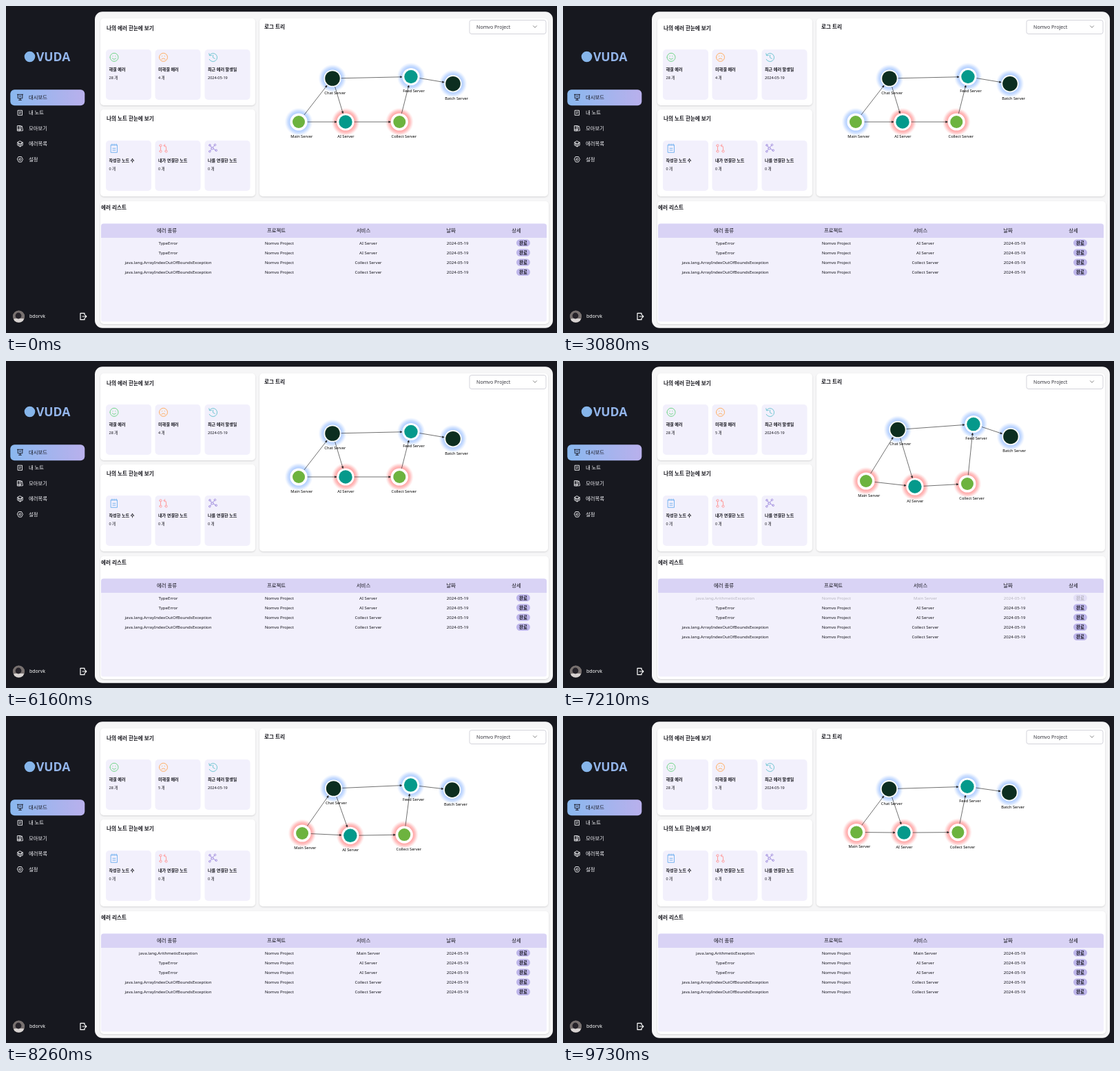
Animation, 800 px wide and 474 px high, one loop 9800 ms. Source, as an HTML page:

```html
<!DOCTYPE html>
<html lang="ko">
<head>
<meta charset="utf-8">
<style>
html, body { margin: 0; width: 100%; height: 100%; overflow: hidden; background: #17181f; }
svg { display: block; width: 800px; height: 474px; font-family: "Noto Sans", "Noto Sans CJK KR", "Noto Sans CJK", sans-serif; }
.icon { fill: none; stroke-linecap: round; stroke-linejoin: round; }
.card { fill: #fff; filter: drop-shadow(0 1px 1px #0002); }
</style>
</head>
<body>
<svg id="stage" viewBox="0 0 800 474">
  <defs>
    <linearGradient id="accent"><stop stop-color="#8ab8ef"/><stop offset="1" stop-color="#b9b0ec"/></linearGradient>
    <radialGradient id="blue"><stop offset=".58" stop-color="#a9c9ff"/><stop offset=".78" stop-color="#b8d2ff" stop-opacity=".7"/><stop offset="1" stop-color="#d0e1ff" stop-opacity="0"/></radialGradient>
    <radialGradient id="red"><stop offset=".58" stop-color="#ff9c9c"/><stop offset=".78" stop-color="#ffacac" stop-opacity=".7"/><stop offset="1" stop-color="#ffcccc" stop-opacity="0"/></radialGradient>
    <clipPath id="face"><circle cx="18.5" cy="450" r="8.7"/></clipPath>
  </defs>
</svg>
<script>
const stage = document.getElementById('stage');
const LOOP = 9800, UPDATE = 6930;

const rect = (x, y, w, h, fill, r = 0, extra = '') =>
  `<rect x="${x}" y="${y}" width="${w}" height="${h}" rx="${r}" fill="${fill}" ${extra}/>`;
const circle = (x, y, r, fill, extra = '') => `<circle cx="${x}" cy="${y}" r="${r}" fill="${fill}" ${extra}/>`;
// y is the middle of the line
const text = (x, y, size, str, { fill = '#15151c', weight = 400, anchor = 'start', extra = '' } = {}) =>
  `<text x="${x}" y="${y + size * .36}" font-size="${size}" font-weight="${weight}" fill="${fill}" text-anchor="${anchor}" ${extra}>${str}</text>`;
const icon = (x, y, color, d, width = 1) =>
  `<path class="icon" transform="translate(${x} ${y})" stroke="${color}" stroke-width="${width}" d="${d}"/>`;
const ring = (x, y, r) => `M${x - r} ${y}a${r} ${r} 0 1 0 ${2 * r} 0a${r} ${r} 0 1 0 ${-2 * r} 0`;
const bold = { weight: 700 };

function sidebar() {
  const menu = [
    ['대시보드', 'M-4-4H4M-3.3-4V1.5H3.3V-4M0 1.5V4M-2 4H2M-1.2-1.5H1.2'],
    ['내 노트', 'M-3-3.5H3V3.5H-3ZM-1.3-1H1.3M-1.3 1H.5'],
    ['모아보기', 'M-3.7-3.7H-1.2V3.7H-3.7ZM-1.2-3.7H1V3.7H-1.2M1.2-2.7L2.8-3.2L4 3.2L2.3 3.7M-3.7 1.8H1'],
    ['에러목록', 'M0-4L3.7-2V2L0 4L-3.7 2V-2ZM-3.7-2L0 0L3.7-2M0 0V4M-2-1V1.5M2-1V1.5'],
    ['설정', 'M-2-3.8H2L4 0L2 3.8H-2L-4 0Z' + ring(0, 0, 1.5)],
  ];
  return circle(34.5, 73.5, 7.8, '#86b5ea') +
    text(44, 73.5, 17.5, 'VUDA', { fill: '#93b5ea', weight: 800 }) +
    rect(6.3, 121.2, 108, 23, 'url(#accent)', 6) +
    menu.map(([name, d], i) => {
      const fill = i ? '#f4f4f8' : '#15151c', y = 132.3 + i * 22.5;
      return icon(20.5, y, fill, d, .9) + text(33, y - .2, 7.3, name, { fill, weight: 500 });
    }).join('') +
    `<g clip-path="url(#face)">${circle(18.5, 450, 9, '#77706f')}${rect(9, 453, 20, 8, '#d8d3d2', 5)}${circle(18, 449, 4.4, '#26232a')}</g>` +
    text(34, 449.5, 7, 'bdorvk', { fill: '#fff' }) +
    icon(112, 450, '#fff', 'M2-2.5V-4.7H-4V4.7H2V2.5M-1 0H4.7M3-1.8L4.8 0L3 1.8', 1.2);
}

function statCard(x, y, color, d, title, value, id = '') {
  return rect(x, y, 66, 73, '#f2f0fc', 5) + icon(x + 12, y + 11.3, color, d) +
    text(x + 4.5, y + 28.5, 6.1, title, bold) + text(x + 4.5, y + 40.8, 5.5, value, { extra: id });
}

function panels() {
  const face = ring(0, 0, 6) + 'M-2-1.7V-1.5M2-1.7V-1.5';
  const card = (x, y, w, h) => rect(x, y, w, h, '#fff', 5, 'class="card"');
  return rect(129, 8.2, 665, 458.6, '#f6f6f7', 11) +
    card(137, 18, 225, 126) + card(137, 150, 225, 126) + card(368, 18, 419, 258) + card(137, 283, 651, 178) +
    text(146, 32, 7.6, '나의 에러 한눈에 보기', bold) +
    statCard(145, 63, '#72d68a', face + 'M-2.8 1.5Q0 4.4 2.8 1.5', '해결 에러', '28 개') +
    statCard(216.5, 63, '#ffad61', face + 'M-2.8 3Q0 .2 2.8 3', '미해결 에러', '4 개', 'id="open"') +
    statCard(288.5, 63, '#70c6d2', 'M-5-3A6 6 0 1 1-5.3 3M-5.7-5.5L-5-2.5L-2-2.7M0-3V.5L2.7 2', '최근 에러 발생일', '2024-05-19') +
    text(146, 163.4, 7.6, '나의 노트 한눈에 보기', bold) +
    statCard(145, 195, '#79b4f0', 'M-4.5-5H4.5V6H-4.5ZM-3-6.3V-4M0-6.3V-4M3-6.3V-4M-2 0H2M-2 2.7H2', '작성한 노트 수', '0 개') +
    statCard(216.5, 195, '#ff9d9d', ring(-4, -4, 1.6) + ring(-4, 4.3, 1.6) + ring(4, 4.3, 1.6) + 'M-4-2.4V2.7M4 2.7V-2Q4-4 1-4M2.5-6L.5-4L2.5-2', '내가 연결한 노트', '0 개') +
    statCard(288.5, 195, '#a391df', ring(-1, 0, 1.7) + ring(-4.5, -4.5, 1.3) + ring(3, -5, 1.3) + ring(-4.7, 4.5, 1.3) + ring(4.7, 3, 1.3) + 'M-3.6-3.5L-2-1.4M2.2-4L0-1.5M-3.8 3.4L-2.2 1.4M.6.7L3.5 2.3', '나를 연결한 노트', '0 개') +
    text(375, 30.3, 7.6, '로그 트리', bold) +
    rect(673, 20.5, 111, 20, '#fff', 3, 'stroke="#cfcfd6" stroke-width=".9"') +
    text(683, 30.1, 7.1, 'Nomvo Project', { fill: '#33333b' }) +
    icon(768, 30, '#777', 'M-2.5-1.2L0 1.3L2.5-1.2', .9);
}

const columns = [235.5, 396.8, 526, 655.7, 751];

function row(y, error, service) {
  const cells = [error, 'Nomvo Project', service, '2024-05-19'];
  return cells.map((s, i) => text(columns[i], y, 6.1, s, { anchor: 'middle' })).join('') +
    rect(741, y - 5.2, 20, 10.4, '#bdb5ea', 5.2) +
    text(751, y, 6.4, '완료', { anchor: 'middle', weight: 600 });
}

function table() {
  const heads = ['에러 종류', '프로젝트', '서비스', '날짜', '상세'];
  const headX = [233.5, 392.5, 519, 646, 741];
  const arrays = 'java.lang.ArrayIndexOutOfBoundsException';
  const rows = [['TypeError', 'AI Server'], ['TypeError', 'AI Server'], [arrays, 'Collect Server'], [arrays, 'Collect Server']];
  return text(138, 292.3, 7.6, '에러 리스트', bold) +
    rect(138, 315.5, 647, 142, '#f2f0fc', 3) +
    `<path fill="#d9d3f5" d="M138 336V319.500q0-4 4-4H781q4 0 4 4V336Z"/>` +
    heads.map((s, i) => text(headX[i], 325.8, 7.4, s, { anchor: 'middle', weight: 500 })).join('') +
    `<g id="fresh">${row(343.4, 'java.lang.ArithmeticException', 'Main Server')}</g>` +
    `<g id="rows">${rows.map((r, i) => row(343.4 + i * 14.1, ...r)).join('')}</g>`;
}

const GREEN = '#6db33f', TEAL = '#05998b', DARK = '#0c2e20';
const discRadius = { [GREEN]: 9, [TEAL]: 9.7, [DARK]: 10.8 };
// path: positions at the times in `times`
const times = [UPDATE, 7210, 7770, 8820, 9800];
const nodes = [
  { name: 'Main', color: GREEN, rest: [425, 168], path: [[445, 176], [440, 174], [433, 171], [428, 169.3], [426, 168.5]] },
  { name: 'AI', color: TEAL, rest: [493, 168], path: [[516, 186], [511, 182], [504, 177], [497, 170.7], [495, 169]] },
  { name: 'Collect', color: GREEN, rest: [571.3, 168], path: [[591, 180], [587, 178], [582, 175], [575.7, 170], [573.3, 168.5]] },
  { name: 'Chat', color: DARK, rest: [474, 105], path: [[492, 96], [486, 99.5], [478, 104], [474, 105.7], [473.5, 105.7]] },
  { name: 'Feed', color: TEAL, rest: [588, 102.5], path: [[601, 87], [596, 91.5], [588.5, 98], [587, 101.5], [587, 102.3]] },
  { name: 'Batch', color: DARK, rest: [649, 112.7], path: [[652, 112], [650, 109.5], [647.5, 104.5], [648, 109], [648, 111]] },
];
const edges = [[0, 3], [0, 1], [3, 1], [3, 4], [1, 2], [2, 4], [4, 5]];

function graph() {
  return nodes.map((n, i) => `<g class="node">${circle(0, 0, 20.5, `url(#${i == 1 || i == 2 ? 'red' : 'blue'})`)}</g>`).join('') +
    edges.map(() => '<path class="edge" stroke="#333" stroke-width=".7" fill="#111"/>').join('') +
    nodes.map(n => `<g class="node">${circle(0, 0, 12.6, '#fff')}${circle(0, 0, discRadius[n.color], n.color)}` +
      text(-11.7, 20.9, 5.7, n.name + ' Server', { fill: '#000' }) + '</g>').join('');
}

stage.insertAdjacentHTML('beforeend', sidebar() + panels() + table() + graph());
const byId = id => document.getElementById(id);
const openCount = byId('open'), fresh = byId('fresh'), rows = byId('rows');
const nodeEls = [...stage.querySelectorAll('.node')];
const edgeEls = [...stage.querySelectorAll('.edge')];
const mainGlow = nodeEls[0].firstChild;

function position(node, t) {
  if (t < UPDATE) return node.rest;
  let i = 0;
  while (i < times.length - 2 && t >= times[i + 1]) i++;
  const u = (t - times[i]) / (times[i + 1] - times[i]);
  const eased = (1 - Math.exp(-u)) / (1 - Math.exp(-1));
  const [a, b] = [node.path[i], node.path[i + 1]];
  return a.map((v, k) => v + (b[k] - v) * eased);
}

function arrow([x1, y1], [x2, y2]) {
  const angle = Math.atan2(y2 - y1, x2 - x1);
  const at = (back, side = 0) =>
    `${x2 - back * Math.cos(angle) - side * Math.sin(angle)} ${y2 - back * Math.sin(angle) + side * Math.cos(angle)}`;
  return `M${x1} ${y1}L${at(14)}M${at(12.8)}L${at(15.6, 1.2)}L${at(15.6, -1.2)}Z`;
}

function draw(now) {
  const t = now % LOOP, updated = t >= UPDATE;
  const spots = nodes.map(n => position(n, t));
  nodeEls.forEach((el, i) => el.setAttribute('transform', `translate(${spots[i % nodes.length]})`));
  edgeEls.forEach((el, i) => el.setAttribute('d', arrow(spots[edges[i][0]], spots[edges[i][1]])));
  mainGlow.setAttribute('fill', `url(#${updated ? 'red' : 'blue'})`);
  openCount.textContent = updated ? '5 개' : '4 개';
  rows.setAttribute('transform', `translate(0 ${updated ? 14.1 : 0})`);
  fresh.setAttribute('opacity', Math.min(1, Math.max(0, (t - 7000) / 770)));
  requestAnimationFrame(() => draw(performance.now()));
}
draw(performance.now());
</script>
</body>
</html>
```
